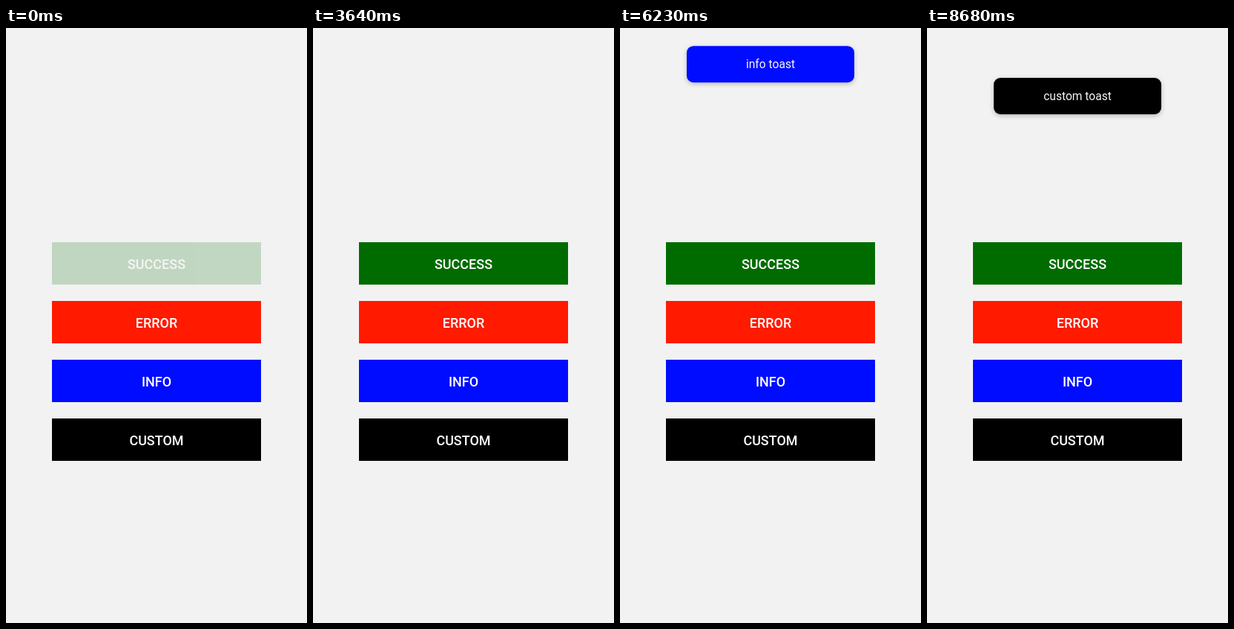
An HTML page for the animation above (8.75 s loop, 406 by 800 pixels).

```html
<!DOCTYPE html>
<html lang="en">
<head>
<meta charset="utf-8">
<title>Toasts</title>
<style>
  html, body { margin: 0; width: 100%; height: 100%; overflow: hidden; background: #f2f2f2; }
  div { position: absolute; text-align: center; color: #fff; font-family: Roboto, sans-serif; }
  .button { left: 62px; width: 282px; height: 57px; font-size: 18px; font-weight: 500; line-height: 59px; }
  .toast {
    left: 90px; top: 0; width: 226px; height: 48.5px; border-radius: 9px;
    font-size: 15.6px; line-height: 50px; color: #f5f7f5;
    box-shadow: 0 2px 6px rgba(0, 0, 0, .25);
  }
</style>
</head>
<body>
<script>
const LOOP = 8750;
const PRESS = 150, RELEASE = 250, DIMMED = 0.2;

// show: the finger lifts and the toast springs in; hide: it leaves; cut: it vanishes
const items = [
  { name: 'success', color: '#006c00', from: -52, rest: 21.8, show: 70, hide: 3090 },
  { name: 'error', color: '#ff1a00', from: 802, rest: 743.3, show: 4150, cut: 5645 },
  { name: 'info', color: '#000cff', from: -52, rest: 21.8, show: 5890, hide: 7300 },
  { name: 'custom', color: '#000', from: -52, rest: 67, show: 7563 },
];

function add(className, text, color) {
  const el = document.createElement('div');
  el.className = className;
  el.textContent = text;
  el.style.background = color;
  document.body.append(el);
  return el;
}

items.forEach((item, i) => {
  item.button = add('button', item.name.toUpperCase(), item.color);
  item.button.style.top = 288 + 79 * i + 'px';
  item.toast = add('toast', item.name + ' toast', item.color);
});

// Underdamped spring from 0 to 1
function spring(ms) {
  if (!(ms > 0)) return 0;
  const s = ms / 1000, decay = 11, freq = 10.45;
  return 1 - Math.exp(-decay * s) * (Math.cos(freq * s) + decay / freq * Math.sin(freq * s));
}

function easeInOut(p) {
  p = Math.min(1, Math.max(0, p));
  return p < 0.5 ? 2 * p * p : 1 - 2 * (1 - p) ** 2;
}

function draw(now) {
  const t = now % LOOP;
  for (const { button, toast, from, rest, show, hide, cut } of items) {
    const pressed = easeInOut((t - show + PRESS) / PRESS) - easeInOut((t - show) / RELEASE);
    button.style.opacity = 1 - (1 - DIMMED) * (show < PRESS && t < show ? 1 : pressed);

    const shown = spring(t - show) - spring(t - hide);
    toast.style.transform = `translateY(${from + (rest - from) * shown}px)`;
    const visible = t > show && !(t > cut) && !(t > hide + 400);
    toast.style.visibility = visible ? 'visible' : 'hidden';
  }
}

const start = performance.now();
function frame() {
  draw(performance.now() - start);
  requestAnimationFrame(frame);
}
frame();
</script>
</body>
</html>
```
